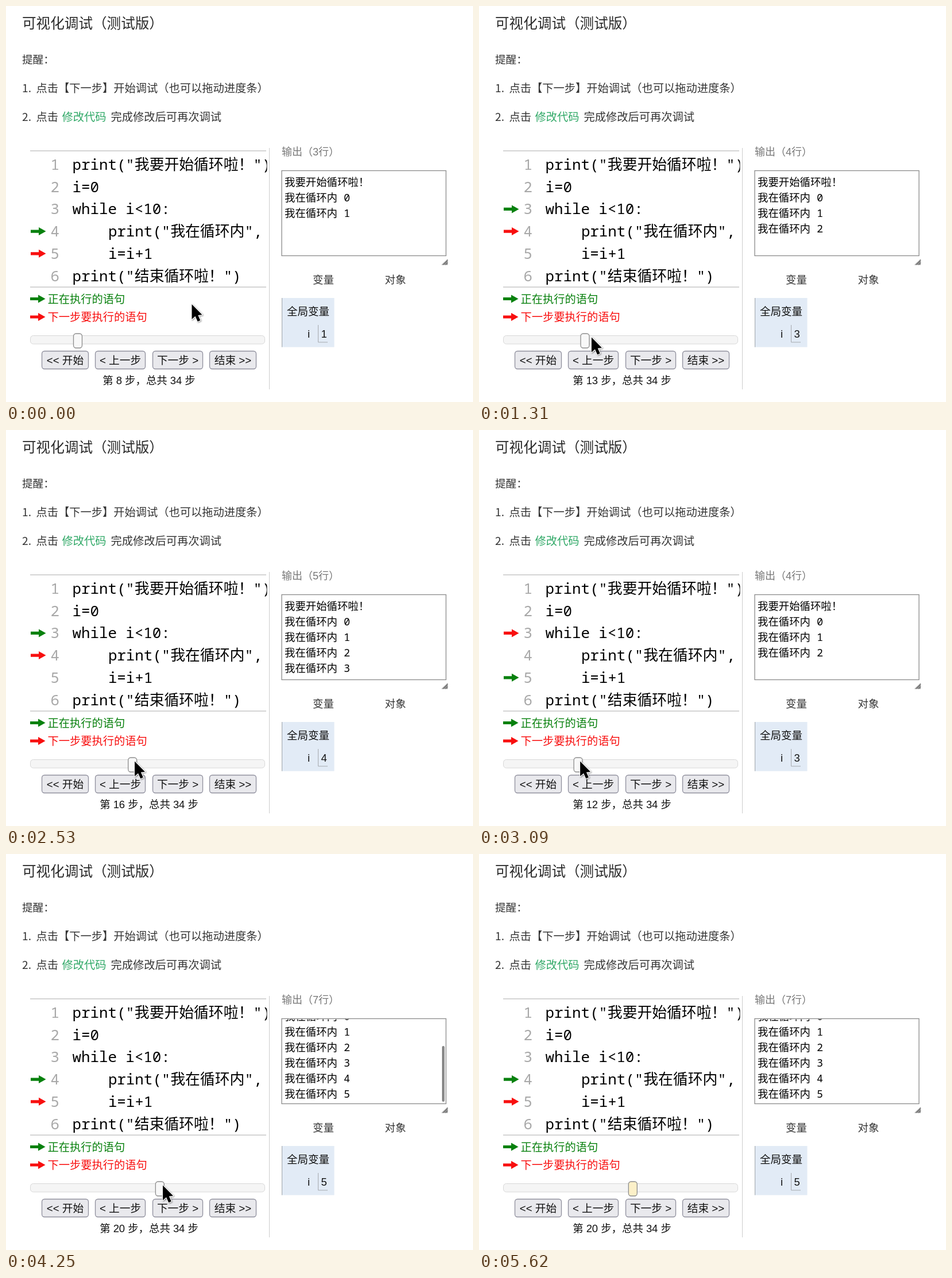
Write an HTML page that moves like this. It is 813 px wide and 689 px high and loops after 5.93 s.

```html
<!DOCTYPE html>
<html lang="zh-CN">
<head>
<meta charset="utf-8">
<title>可视化调试</title>
<style>
  html, body { margin: 0; width: 100%; height: 100%; overflow: hidden; background: #fff; }
  svg { display: block; }
  text { white-space: pre; font: 18.4px "Liberation Sans", "Noto Sans CJK SC", sans-serif; fill: #111; }
  .note { font: 500 19.25px "Noto Sans CJK SC", sans-serif; fill: #333; }
  .code { font: 25.8px "Noto Sans Mono", "Noto Sans CJK SC", monospace; fill: #000; }
  .num { fill: #a8a8a8; }
  .out { font: 18.4px "Noto Sans Mono", "Noto Sans CJK SC", monospace; fill: #000; }
  .mid { text-anchor: middle; }
</style>
</head>
<body>
<svg id="stage" width="813" height="689" viewBox="0 0 813 689">
  <defs>
    <path id="arrow" d="M0-2.6H14V-7L26.5 0L14 7V2.6H0Z"/>
    <clipPath id="codeClip"><rect x="42" y="252" width="412.5" height="237"/></clipPath>
    <clipPath id="outClip"><rect x="481" y="287.5" width="284" height="146"/></clipPath>
  </defs>
  <rect width="813" height="689" fill="#fff"/>
  <g id="page"></g>
</svg>
<script>
const LOOP = 5930, LINE = 27;
const page = document.getElementById("page");

function add(tag, attrs, text = "", parent = page) {
  const el = document.createElementNS("http://www.w3.org/2000/svg", tag);
  for (const k in attrs) el.setAttribute(k, attrs[k]);
  el.textContent = text;
  parent.appendChild(el);
  return el;
}
const set = (el, attrs) => { for (const k in attrs) el.setAttribute(k, attrs[k]); };
const label = (x, y, text, cls = "", style = "", parent = page) =>
  add("text", { x, y, class: cls, style }, text, parent);
const line = (d, stroke) => add("path", { d, stroke, fill: "none" });
const arrow = (x, y, fill) => add("use", { href: "#arrow", x, y, fill });

// Heading and hints
label(28, 38.5, "可视化调试（测试版）", "note", "font-size:24.6px;fill:#2b2b2b");
label(28, 99.5, "提醒：", "note", "font-size:18.6px");
label(28, 149.5, "1.", "note");
label(52.5, 149.5, "点击【下一步】开始调试（也可以拖动进度条）", "note");
label(28, 199.5, "2.", "note");
label(52.5, 199.5, "点击", "note");
label(97.5, 199.5, "修改代码", "note", "fill:#2fa866");
label(182.5, 199.5, "完成修改后可再次调试", "note");

// Code listing
const codeBox = add("g", { "clip-path": "url(#codeClip)" });
const rowY = n => 276 + (n - 1) * 38.7;
[
  'print("我要开始循环啦！")',
  "i=0",
  "while i<10:",
  '    print("我在循环内", i)',
  "    i=i+1",
  'print("结束循环啦！")'
].forEach((src, k) => {
  const y = rowY(k + 1) + 9;
  label(77.5, y, k + 1, "code num", "", codeBox);
  label(115.5 + 15.6 * src.search(/\S/), y, src.trim(), "code", "", codeBox);
});
line("M42 252H453M42 489H453", "#aaa");
line("M458.5 247V667", "#ccc");
const doneArrow = arrow(43, 0, "#08810e");
const nextArrow = arrow(43, 0, "#f80f0f");
arrow(42, 509.5, "#08810e");
label(72.5, 517, "正在执行的语句", "note", "fill:#08810e");
arrow(42, 541, "#f80f0f");
label(72.5, 548, "下一步要执行的语句", "note", "fill:#f80f0f");

// Slider and buttons
add("rect", { x: 42.5, y: 573.5, width: 408, height: 14.5, rx: 5, fill: "#f5f5f5", stroke: "#d8d8d8" });
const knob = add("rect", { y: 570, width: 15, height: 25, rx: 4.5, stroke: "#8c8c8c", "stroke-width": 1.3 });
[[62.5, 81, "<< 开始"], [155.5, 87, "< 上一步"], [255.5, 87, "下一步 >"], [354.5, 81, "结束 >>"]]
  .forEach(([x, width, text]) => {
    add("rect", { x, y: 600.5, width, height: 31, rx: 4.5, fill: "#e9e9ed", stroke: "#8f8f9d", "stroke-width": 1.3 });
    label(x + width / 2, 623, text, "mid", "font-size:18.7px");
  });
const status = label(249, 658, "", "mid");

// Output panel
const outTitle = label(480, 260, "", "", "font-size:18px;fill:#777");
add("rect", { x: 480, y: 286.5, width: 286, height: 148, fill: "#fff", stroke: "#8a8a8a", "stroke-width": 1.3 });
const outBox = add("g", { "clip-path": "url(#outClip)" });
const outText = add("g", {}, "", outBox);
const outLines = Array.from({ length: 12 }, (_, k) =>
  label(485, 313 + k * LINE, k ? "我在循环内 " + (k - 1) : "我要开始循环啦！", "out", "", outText));
const bar = add("rect", { x: 759, width: 4.5, rx: 2.2, fill: "#888" });
add("path", { d: "M758 450.5L769 440V450.5Z", fill: "#999" });
line("M761 450.5L769 442.5M765 450.5L769 446.5", "#555");

// Variables panel
label(552.5, 483, "变量", "mid", "fill:#333");
label(678, 483, "对象", "mid", "fill:#333");
add("rect", { x: 480, y: 508, width: 91.5, height: 85.5, fill: "#e2ebf6" });
line("M480.5 508V593.5", "#9da3aa");
label(526, 538, "全局变量", "mid", "font-size:18.5px");
label(525, 576.5, "i");
line("M543.5 555V585H560", "#a5a9ae");
const value = label(553.5, 576.5, "", "mid");

const cursor = add("path", {
  d: "M0 0V26L6 20.8L10.2 30L14.8 28L10.8 19L18 18.2Z",
  fill: "#000", stroke: "#fff", "stroke-width": 2.4, "stroke-linejoin": "round",
  style: "paint-order:stroke;filter:drop-shadow(1px 1px 1px rgba(0,0,0,.4))"
});

// Pointer path: time, x, y
const path = [
  [0, 323.5, 519], [30, 323.5, 519], [380, 131, 576.5], [780, 131, 576.5],
  [1310, 195.9, 576.5], [1400, 195.9, 576.5], [1790, 273, 576.5], [1850, 273, 576.5],
  [2000, 290, 576.5], [2170, 290, 576.5], [2530, 224, 576.5], [2570, 224, 576.5],
  [2720, 205, 576.5], [2770, 205, 576.5], [3270, 160, 576.5], [3390, 160, 576.5],
  [3650, 197, 576.5], [3700, 197, 576.5], [3960, 235, 576.5], [4010, 235, 576.5],
  [4250, 273, 576.5], [4300, 273, 576.5], [4580, 290, 700], [LOOP, 290, 700]
];
const RELEASE = 4300;

function pointer(t) {
  const k = Math.max(1, path.findIndex(p => p[0] >= t));
  const [t0, x0, y0] = path[k - 1], [t1, x1, y1] = path[k];
  const f = (t - t0) / (t1 - t0);
  return [x0 + (x1 - x0) * f, y0 + (y1 - y0) * f];
}

function stepAt(t, x) {
  if (t < 780) return 8;
  if (t >= RELEASE) return 20;
  return Math.round(8 + (x - 131) / 11.9);
}

// State of the traced program inside its loop
function trace(step) {
  const turn = Math.floor((step - 5) / 3), phase = (step - 5) % 3;
  return {
    done: [4, 5, 3][phase],
    next: [5, 3, 4][phase],
    i: turn + (phase > 0),
    rows: turn + 2
  };
}

function draw(t) {
  const [x, y] = pointer(t);
  const step = stepAt(t, x);
  const s = trace(step);
  set(cursor, { transform: `translate(${x} ${y})` });
  set(knob, { x: 117.5 + (step - 8) * 11.9, fill: t > RELEASE + 30 ? "#fcf0c8" : "#f8f8f8" });
  set(doneArrow, { y: rowY(s.done) });
  set(nextArrow, { y: rowY(s.next) });
  status.textContent = `第 ${step} 步，总共 34 步`;
  outTitle.textContent = `输出（${s.rows}行）`;
  value.textContent = s.i;

  outLines.forEach((el, k) => set(el, { visibility: k < s.rows ? "visible" : "hidden" }));
  const scroll = Math.max(0, s.rows * LINE - 138);
  set(outText, { transform: `translate(0 ${-scroll})` });
  const height = 97 * 7 / s.rows;
  const fade = Math.min(1, Math.max(0, (5620 - t) / 480));
  set(bar, { y: 431 - height, height, opacity: s.rows > 5 ? fade : 0 });
}

const start = performance.now();
function tick() {
  draw((performance.now() - start) % LOOP);
  requestAnimationFrame(tick);
}
tick();
</script>
</body>
</html>
```
